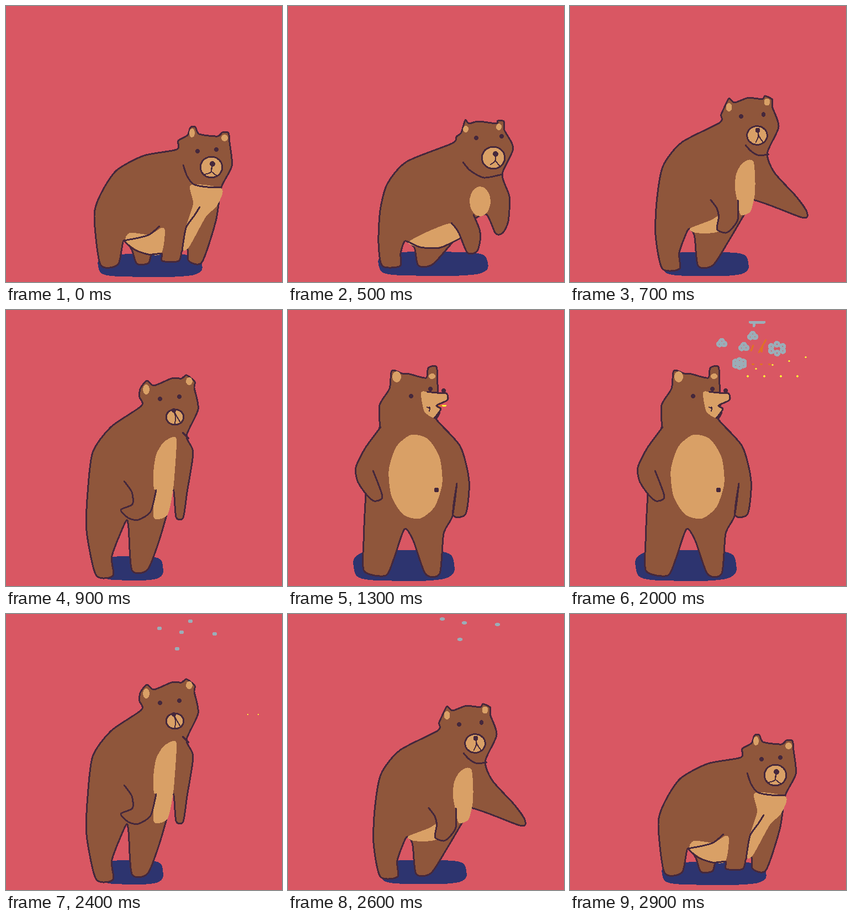
An HTML page for the animation above (3.4 s loop, 500x500 px).

```html
<!DOCTYPE html>
<html lang="en">
<head>
<meta charset="utf-8">
<title>Bear</title>
<style>
  html, body { margin: 0; width: 100%; height: 100%; overflow: hidden; background: #d95763; }
  svg { display: block; width: 100%; height: 100%; shape-rendering: crispEdges; }
</style>
</head>
<body>
<svg id="stage" viewBox="0 0 500 500"></svg>
<script>
const BROWN = '#8f563b', TAN = '#d9a066', INK = '#45283c', NAVY = '#2d346f';
const SMOKE = '#9badb7', ORANGE = '#df7126', YELLOW = '#fbf236';
const LOOP = 3400, STEP = 100;

// Parts in paint order: [name, fill, stroke, closed]
const PARTS = [
  ['shadow', NAVY, 'none', true],
  ['body', BROWN, INK, true],
  ['chest', TAN, 'none', true],
  ['under', TAN, 'none', true],
  ['arm', BROWN, INK, false],
  ['hem', 'none', INK, false],
  ['haunch', 'none', INK, false],
  ['leg', 'none', INK, false],
  ['jaw', 'none', INK, false],
  ['earL', TAN, 'none', true],
  ['earR', TAN, 'none', true],
  ['snout', TAN, INK, true],
  ['mouth', 'none', INK, false],
  ['nose', INK, 'none', true],
  ['eyeL', INK, 'none', true],
  ['eyeR', INK, 'none', true],
  ['navel', INK, 'none', true]
];

const points = text => text.trim().split(/\s+/).map(pair => pair.split(',').map(Number));

// Ten points around an oval; a power below 1 squares it off.
function oval(cx, cy, rx, ry = rx, power = 1) {
  const bend = v => Math.sign(v) * Math.abs(v) ** power;
  return Array.from({ length: 10 }, (_, i) => {
    const angle = (i / 10 - 0.375) * 2 * Math.PI;
    return [cx + rx * bend(Math.cos(angle)), cy + ry * bend(Math.sin(angle))];
  });
}
const shadow = (cx, cy, rx, ry) => oval(cx, cy, rx, ry, 0.55);
const eye = (cx, cy) => oval(cx, cy, 4, 4.5);

const crouch = {
  shadow: shadow(261, 470, 95, 21),
  body: points(`309,260 312,244 329,234 334,220 343,219 350,232 383,236 392,229 403,230 405,247
    409,290 390,329 380,390 355,464 331,462 329,441 319,443 313,462 283,462 282,448 264,450
    258,466 237,467 228,442 213,425 203,468 171,468 160,380 172,340 200,298 250,271`),
  chest: points('335,324 391,331 382,362 362,382 332,436 320,441 326,400 339,358'),
  under: points('217,427 224,411 260,414 281,402 288,408 281,449 250,448'),
  hem: points('213,425 232,441 258,450 281,448'),
  haunch: points('213,425 240,420 260,414 278,399'),
  leg: points('351,364 341,380 326,402 319,443'),
  jaw: points('321,288 328,308 340,323 365,328 390,328'),
  earL: oval(337, 230, 5, 8),
  earR: oval(396, 239, 6),
  snout: oval(372, 292, 20, 19),
  mouth: points('360,305 371,301 374,287 372,299 381,307'),
  nose: oval(374, 286, 5),
  eyeL: eye(347, 263),
  eyeR: eye(381, 260)
};

const rise = {
  shadow: shadow(263, 467, 100, 22),
  body: points(`297,249 305,237 314,229 321,207 328,213 345,209 378,213 380,208 391,209 392,225
    408,258 388,305 401,345 399,390 389,411 376,412 360,378 338,386 300,426 262,468 236,470
    229,438 212,426 204,448 203,471 171,471 164,430 167,370 180,322 215,282`),
  chest: oval(348, 354, 19, 27),
  under: points('218,428 248,411 296,394 312,422 262,439 232,436'),
  arm: points('296,393 303,401 310,412 325,447 342,445 348,425 347,405 336,378'),
  hem: points('218,427 240,437 275,438 312,421'),
  jaw: points('317,283 330,298 355,311 388,305'),
  earL: oval(322, 223, 5, 6),
  earR: oval(382, 219, 5, 6),
  snout: oval(372, 275, 21, 20),
  mouth: points('367,287 375,281 376,269 376,280 383,289'),
  nose: oval(376, 268, 5),
  eyeL: eye(341, 239),
  eyeR: eye(387, 236)
};

const lean = {
  shadow: shadow(228, 468, 57, 22),
  body: points(`245,174 242,158 243,143 255,128 268,137 300,124 318,124 327,118 342,130 341,141
    348,180 327,228 339,258 328,330 321,376 308,375 303,325 290,375 275,425 256,471 228,471
    222,395 217,383 192,445 194,481 163,480 146,400 148,330 157,258 190,212`),
  chest: points(`285,240 302,230 309,236 306,290 302,330 292,372 268,377 268,335 267,295
    272,262`),
  under: points('217,378 262,365 275,350 292,368 262,382 225,386'),
  arm: points('214,310 228,330 229,352 208,362 222,377 240,380 262,365 272,326'),
  jaw: points('320,222 325,227 328,230 331,233'),
  earL: oval(254, 144, 6, 9),
  earR: oval(332, 129, 6, 7),
  snout: oval(306, 194, 16, 14),
  mouth: points('306,207 307,193 304,183 309,192 316,204'),
  nose: oval(304, 182, 4),
  eyeL: eye(279, 161),
  eyeR: eye(314, 157)
};

const stand = {
  shadow: shadow(210, 463, 92, 28),
  body: points(`166,212 166,172 184,142 188,110 207,115 220,116 250,123 254,105 269,103 271,135
    272,175 268,197 312,247 328,310 322,369 299,371 306,314 298,373 282,405 275,477 249,478
    227,418 211,397 192,450 177,481 138,473 137,420 141,333 147,260 158,228`),
  chest: oval(231, 302, 49, 77),
  arm: points('168,212 140,250 123,285 126,310 141,333 156,346 171,338 154,291'),
  jaw: points('275,184 273,190 270,195 268,197'),
  earL: oval(197, 121, 8, 10),
  earR: oval(261, 120, 6, 5),
  snout: points('241,150 252,148 270,150 287,151 289,163 269,173 277,179 270,190 265,196 247,184'),
  mouth: points('252,176 257,178 256,176 257,178 256,183'),
  nose: oval(282, 146, 4),
  eyeL: eye(223, 156),
  eyeR: eye(258, 143),
  navel: oval(269, 326, 4.5)
};

const mix = (a, b, t) => a + (b - a) * t;
const mixPoint = (p, q, t) => [mix(p[0], q[0], t), mix(p[1], q[1], t)];

function blend(from, to, t) {
  const shared = Object.keys(from).filter(name => to[name]);
  return Object.fromEntries(shared.map(name =>
    [name, from[name].map((p, i) => mixPoint(p, to[name][i], t))]));
}

function rotate([x, y], [cx, cy], angle) {
  const c = Math.cos(angle), s = Math.sin(angle);
  return [cx + (x - cx) * c - (y - cy) * s, cy + (x - cx) * s + (y - cy) * c];
}

// The far arm swings forward from the shoulder while the bear gets up.
const SHOULDER = 12, HAND = 15;
function getUp(t) {
  const bear = blend(rise, lean, t);
  for (let i = SHOULDER + 1; i <= HAND; i++) {
    bear.body[i] = rotate(bear.body[i], bear.body[SHOULDER], -0.85 * Math.sin(Math.PI * t));
  }
  return bear;
}

function curve(list, closed) {
  const n = list.length;
  const at = i => closed ? list[(i + n) % n] : list[Math.max(0, Math.min(n - 1, i))];
  const handle = (p, from, to) => p.map((v, k) => (v + (to[k] - from[k]) / 8).toFixed(1));
  let d = 'M' + list[0];
  for (let i = 0; i < (closed ? n : n - 1); i++) {
    const [a, b, c, e] = [at(i - 1), at(i), at(i + 1), at(i + 2)];
    d += `C${handle(b, a, c)} ${handle(c, e, b)} ${c}`;
  }
  return d + (closed ? 'Z' : '');
}

const path = (d, fill, stroke = 'none', width = 3) =>
  `<path d="${d}" fill="${fill}" stroke="${stroke}" stroke-width="${width}" ` +
  'stroke-linejoin="round" stroke-linecap="round"/>';
const dot = ([x, y], rx, fill, ry = rx) =>
  `<ellipse cx="${x}" cy="${y}" rx="${rx}" ry="${ry}" fill="${fill}"/>`;
const streak = (a, b, color, width = 3) => path(`M${a}L${b}`, 'none', color, width);

function drawBear(bear) {
  return PARTS.filter(([name]) => bear[name]).map(([name, fill, stroke, closed]) => {
    const list = bear[name];
    // In profile the snout runs into the cheek without a line.
    if (name === 'snout' && bear === stand) {
      return path(curve(list, true), fill) + path(curve(list.slice(1, 9)), 'none', stroke);
    }
    return path(curve(list, closed), fill, stroke, name === 'mouth' ? 2 : 3);
  }).join('');
}

const BURST = [350, 76];
const PUFFS = [[275, 60, 8], [315, 67, 8], [331, 47, 8], [375, 70, 20], [307, 97, 14]];

// Smoke swells until s = 0, then shrinks to a speck while rising.
function drawPuff([x, y, r], s) {
  const size = 1 - 0.8 * Math.abs(s), cx = x + 3 * s, cy = y - 34 * s;
  if (cy < 6) return '';
  if (size < 0.5) return dot([cx, cy], 4.5, SMOKE, 3);
  let out = '';
  for (let a = 0.5; a < 6; a += r > 10 ? 1.05 : 2.1) {
    const lobe = [cx + Math.cos(a) * r * size * 0.6, cy + Math.sin(a) * r * size * 0.4];
    out += `<circle cx="${lobe[0]}" cy="${lobe[1]}" r="${3.5 * size}" fill="none" ` +
      `stroke="${SMOKE}" stroke-width="${5 * size}"/>`;
  }
  return out;
}

// Sparks fan out in two staggered rows and fall; the outermost last longest.
function drawSparks(s, grow) {
  let out = '';
  for (let i = 0; i < 8; i++) {
    if (s > (i > 5 ? 1 : 0.5)) continue;
    const peak = [322 + i * 15, i % 2 ? 110 - i * 3.5 : 120];
    const fall = [peak[0] + i * 4.3, 182];
    const p = s < 0 ? mixPoint(BURST, peak, grow) : mixPoint(peak, fall, s);
    out += dot(p, 1.8 - Math.max(0, s) * 0.6, YELLOW);
  }
  return out;
}

function drawRocket(p) {
  const [x, y] = mixPoint([280, 173], [354, 82], p);
  const tilt = 9 * Math.min(1, p * 3);
  return streak([x - 7, y + tilt], [x, y], ORANGE) + streak([x, y], [x + 6, y - tilt], YELLOW);
}

function drawBurst(time) {
  const s = (time - 2000) / 400, grow = Math.min(1, (time - 1600) / 400);
  let out = PUFFS.map(puff => drawPuff(puff, s)).join('');
  if (s <= 0) {
    out += streak([326, 22], [352, 22], SMOKE, 5) + streak([333, 22], [333, 29], SMOKE, 5);
  }
  if (s <= 0.25) {
    const flame = (a, b) => streak(mixPoint(BURST, a, grow), mixPoint(BURST, b, grow), ORANGE);
    out += flame([355, 54], [342, 77]) + flame([349, 65], [347, 76]) + flame([332, 64], [328, 74]);
    for (let x = 330; x < 365; x += 15) out += flame([x, 98], [x + 3, 98]);
  }
  return out + drawSparks(s, grow);
}

function drawShot(time) {
  if (time < 1300 || time >= 2900) return '';
  return time < 1700 ? drawRocket((time - 1300) / 300) : drawBurst(time);
}

function bearAt(time) {
  if (time < 500 || time >= 2900) return crouch;
  // The way down repeats the way up in reverse.
  const t = Math.min(time, 3300 - time);
  if (t === 500) return rise;
  if (t < 900) return getUp((t - 500) / 400);
  return t < 1300 ? blend(lean, stand, (t - 900) / 400) : stand;
}

const stage = document.getElementById('stage');
const start = performance.now();
let shown = -1;

function tick() {
  const time = Math.floor((performance.now() - start) % LOOP / STEP) * STEP;
  if (time !== shown) {
    shown = time;
    stage.innerHTML = '<rect width="500" height="500" fill="#d95763"/>' +
      drawBear(bearAt(time)) + drawShot(time);
  }
  requestAnimationFrame(tick);
}
tick();
</script>
</body>
</html>
```
